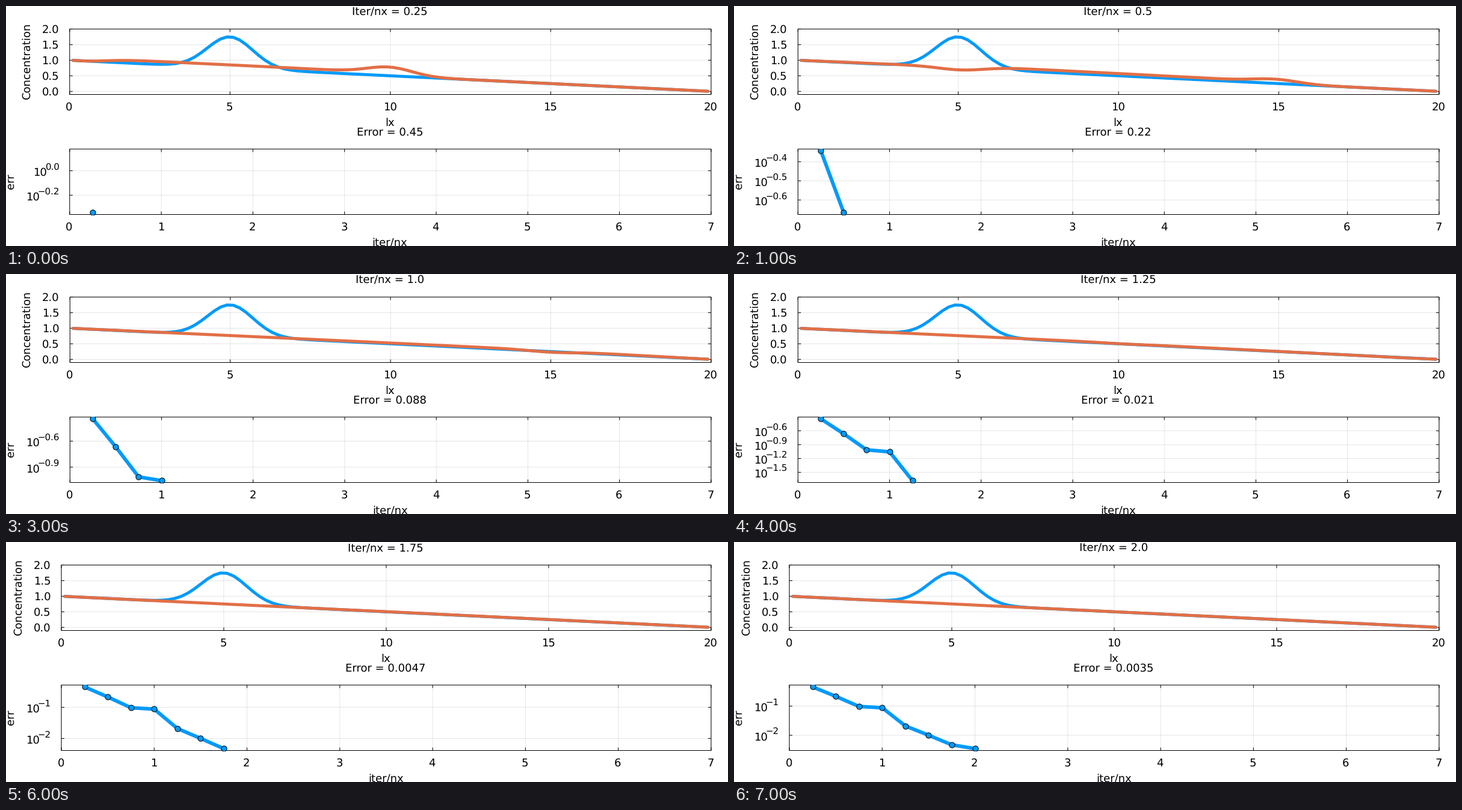
Recreate the animation shown at these times as a matplotlib script. Size 1200 by 400 pixels, loop 8 s.

```python
import numpy as np
import matplotlib.pyplot as plt
from matplotlib.animation import FuncAnimation
from matplotlib.patches import Rectangle

plt.rcParams["font.family"] = "DejaVu Sans"
plt.rcParams["text.hinting"] = "no_hinting"

W, H, DPI = 1200, 400, 100
PX = 72 / DPI                      # points per pixel
BLUE, ORANGE = "#009AFA", "#E26F46"
FONT, SMALL = 18, 15
RIGHT = 1171.9
TOP_BOX = (38.4, 147.5)
LOW_BOX = (238.4, 347.5)
STEPS, NX, LX = 8, 100, 20.0

# Decade ticks of the error axis at each step
LOG_TICKS = [
    (0.0, -0.2), (-0.4, -0.5, -0.6), (-0.6, -0.9), (-0.6, -0.9),
    (-0.6, -0.9, -1.2, -1.5), (-1, -2), (-1, -2), (-1, -2),
]


def solve():
    """Accelerated pseudo-transient diffusion with fixed ends."""
    dx = LX / NX
    rho = (LX / (2 * np.pi)) ** 2
    dt = dx * np.sqrt(rho)
    x = np.linspace(dx / 2, LX - dx / 2, NX)
    c = 1 + np.exp(-(x - LX / 4) ** 2) - x / LX
    start, q = c.copy(), np.zeros(NX - 1)
    curves, errors = [], []
    for it in range(1, STEPS * NX // 4 + 1):
        q -= dt / (rho + dt) * (q + np.diff(c) / dx)
        c[1:-1] -= dt * np.diff(q) / dx
        if it % (NX // 4) == 0:
            curves.append(c.copy())
            errors.append(np.abs(np.diff(c, 2)).max() / dx ** 2)
    return x, start, curves, np.array(errors)


X, START, CURVES, ERRORS = solve()
ITERS = 0.25 * np.arange(1, STEPS + 1)

fig = plt.figure(figsize=(W / DPI, H / DPI), dpi=DPI, facecolor="white")
ax = fig.add_axes([0, 0, 1, 1])


def scale(v, v0, v1, p0, p1):
    return p0 + (np.asarray(v) - v0) / (v1 - v0) * (p1 - p0)


def text(x, y, s, ha="center", size=FONT, **kw):
    # Shift left by about one side bearing to centre the ink
    return ax.text(x - 0.8, y, s, ha=ha, va="baseline", fontsize=size * PX,
                   color="black", **kw)


def upright(x, y, s):
    text(x, y, s, rotation=90, rotation_mode="anchor")


def power_label(x, y, exponent):
    label = str(exponent).replace("-", "\u2212")
    sup = text(x + 0.8, y - 1.8, label, "right", SMALL)
    text(sup.get_window_extent().x0 + 4, y + 8.5, "10", "right")


def rule(xs, ys, **kw):
    ax.plot(xs, ys, lw=PX, solid_capstyle="butt", snap=False, **kw)


def panel(left, box, xticks, yticks):
    """Grid, inward ticks on all four sides and the frame, in pixels."""
    top, bottom = box
    for x in xticks:
        rule([x, x], [top, bottom], color="black", alpha=0.1, zorder=1)
        rule([x, x], [top, top + 5], color="black", zorder=2)
        rule([x, x], [bottom - 5, bottom], color="black", zorder=2)
    for y in yticks:
        rule([left, RIGHT], [y, y], color="black", alpha=0.1, zorder=1)
        rule([left, left + 5], [y, y], color="black", zorder=2)
        rule([RIGHT - 5, RIGHT], [y, y], color="black", zorder=2)
    ax.add_patch(Rectangle((left, top), RIGHT - left, bottom - top,
                           fill=False, ec="black", lw=PX, snap=False,
                           zorder=2))


def series(left, box, xs, ys, color, width, **kw):
    line, = ax.plot(xs, ys, color=color, lw=width * PX, zorder=3, snap=False,
                    solid_capstyle="round", solid_joinstyle="round", **kw)
    top, bottom = box
    line.set_clip_path(Rectangle((left, top), RIGHT - left, bottom - top,
                                 transform=ax.transData))


def draw_profile(left, k):
    xticks = np.arange(0, 21, 5)
    yticks = np.arange(0, 2.1, 0.5)
    px = scale(xticks, 0, LX, left, RIGHT)
    py = scale(yticks, -0.1, 2, *TOP_BOX[::-1])
    panel(left, TOP_BOX, px, py)
    for x, v in zip(px, xticks):
        text(x, 173.5, str(v))
    for y, v in zip(py, yticks):
        text(left - 17, y + 6.5, f"{v:.1f}", "right")
    xs = scale(X, 0, LX, left, RIGHT)
    for c, color in ((START, BLUE), (CURVES[k], ORANGE)):
        series(left, TOP_BOX, xs, scale(c, -0.1, 2, *TOP_BOX[::-1]), color, 5)
    mid = (left + RIGHT) / 2
    text(mid, 15.5, f"Iter/nx = {ITERS[k]}")
    text(mid, 200.5, "lx")
    upright(left - 65.4, 91, "Concentration")


def draw_error(left, k):
    errs = ERRORS[:k + 1]
    logs = np.log10(errs)
    low, high = logs.min(), logs.max()
    if k == 0:
        high = np.log10(errs[0] + 1)
    pad = 0.03 * (high - low)
    limits = (low - pad, high + pad)

    xticks = np.arange(8)
    px = scale(xticks, 0, 7, left, RIGHT)
    py = scale(LOG_TICKS[k], *limits, *LOW_BOX[::-1])
    panel(left, LOW_BOX, px, py)
    for x, v in zip(px, xticks):
        text(x, 373.5, str(v))
    for y, v in zip(py, LOG_TICKS[k]):
        power_label(left - 17, y, v)
    series(left, LOW_BOX, scale(ITERS[:k + 1], 0, 7, left, RIGHT),
           scale(logs, *limits, *LOW_BOX[::-1]), BLUE, 6,
           marker="o", ms=9.2 * PX, mec="black", mew=PX)
    mid = (left + RIGHT) / 2
    text(mid, 215.5, f"Error = {float(f'{errs[-1]:.2g}')}")
    text(mid, 400.3, "iter/nx")
    upright(14, 292, "err")


def draw(k):
    ax.clear()
    ax.set(xlim=(0, W), ylim=(H, 0))
    ax.axis("off")
    left = 105.8 if k == 0 else 106.3 if k < 5 else 92.0
    draw_profile(left, k)
    draw_error(left, k)
    return []


anim = FuncAnimation(fig, draw, frames=STEPS, interval=1000,
                     repeat=True, repeat_delay=0, blit=False)
plt.show()
```
